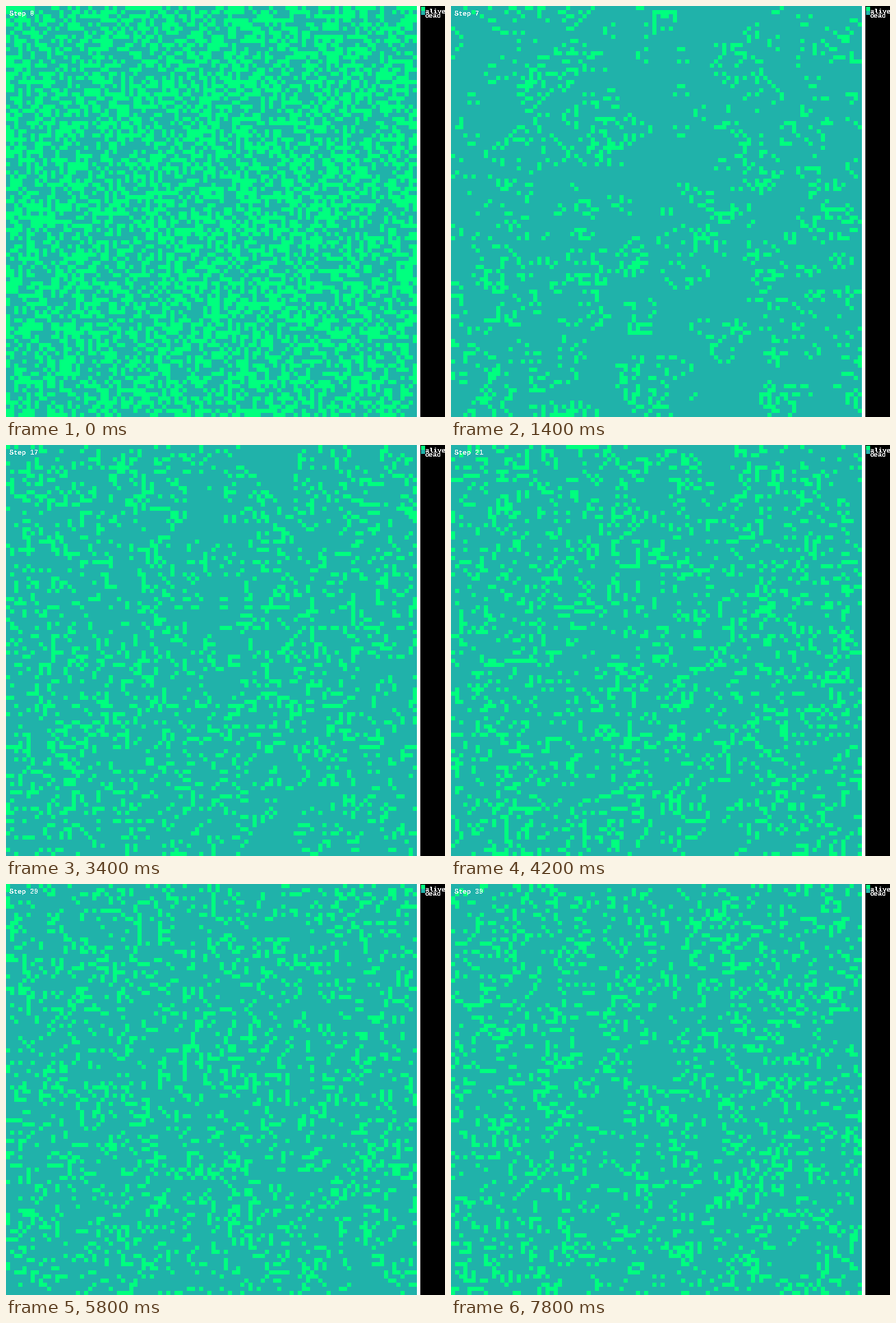
These frames come from a looping animation (641x600 px, 8000 ms). A matplotlib script:

```python
"""Seeds (B2/S0) cellular automaton on a 100 x 100 torus, with a step counter."""
import matplotlib.pyplot as plt
import numpy as np
from matplotlib.animation import FuncAnimation

WIDTH, HEIGHT, DPI = 641, 600, 64
GRID, CELL = 100, 6
STEPS, INTERVAL = 40, 200

ALIVE = (0, 255, 127)
DEAD = (32, 178, 170)
PALETTE = np.array([DEAD, ALIVE], dtype=np.uint8)

plt.rcParams["text.antialiased"] = False
plt.rcParams["text.hinting"] = "native"
plt.rcParams["text.hinting_factor"] = 1


def evolve(cells):
    """A dead cell with exactly two live neighbours is born; live cells die."""
    neighbours = sum(
        np.roll(cells, (dy, dx), axis=(0, 1))
        for dy in (-1, 0, 1)
        for dx in (-1, 0, 1)
        if (dy, dx) != (0, 0)
    )
    return ((cells == 0) & (neighbours == 2)).astype(int)


def history(seed):
    rng = np.random.default_rng(seed)
    states = [rng.integers(0, 2, (GRID, GRID))]
    while len(states) < STEPS:
        states.append(evolve(states[-1]))
    return states


def render(cells):
    """Whole stage: board, white gutter and black legend panel."""
    stage = np.full((HEIGHT, WIDTH, 3), 255, dtype=np.uint8)
    board = cells.repeat(CELL, axis=0).repeat(CELL, axis=1)
    stage[:, : GRID * CELL] = PALETTE[board]
    stage[:, 605:] = 0
    stage[1:7, 606:612] = ALIVE
    stage[7:13, 606:612] = DEAD
    return stage


states = history(7)

fig = plt.figure(figsize=(WIDTH / DPI, HEIGHT / DPI), dpi=DPI)
ax = fig.add_axes([0, 0, 1, 1])
ax.set_axis_off()
image = ax.imshow(render(states[0]), extent=(0, WIDTH, HEIGHT, 0),
                  interpolation="nearest", aspect="auto")
ax.set_xlim(0, WIDTH)
ax.set_ylim(HEIGHT, 0)


def label(x, baseline, text):
    return ax.text(x, baseline, text, color="white", family="Liberation Mono",
                   weight="bold", size=10 * 72 / DPI, va="baseline", ha="left")


label(612, 11, "alive")
label(612, 17, "dead")
counter = label(5, 14, "Step 0")


def update(step):
    image.set_data(render(states[step]))
    counter.set_text(f"Step {step}")
    return image, counter


anim = FuncAnimation(fig, update, frames=STEPS, interval=INTERVAL,
                     repeat=True, repeat_delay=0, blit=False)
plt.show()
```
